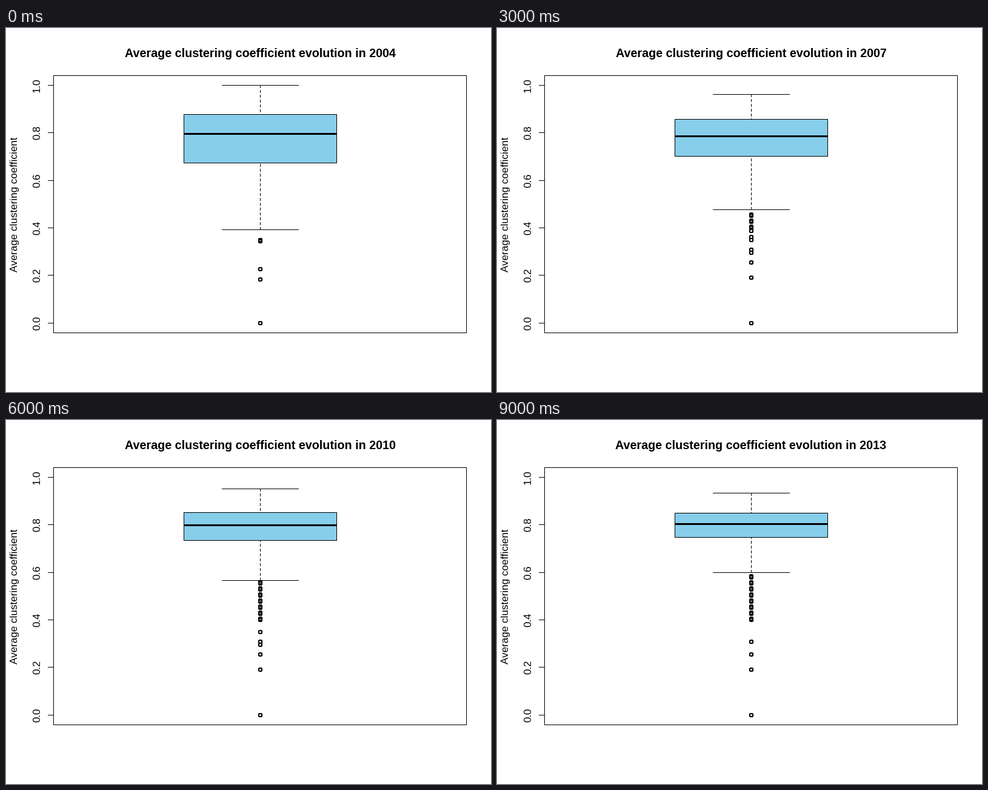
Animation of 800x600 px, one loop 10 s. Source, as a matplotlib script:

```python
import matplotlib.pyplot as plt
import numpy as np
from matplotlib.animation import FuncAnimation
from matplotlib.patches import Rectangle

W, H, DPI = 800, 600, 100
PX = 72 / DPI                      # points per pixel
FIRST_YEAR, YEARS = 2004, 10
MID, BOX_L, BOX_R, CAP_L, CAP_R = 419, 293, 545, 356, 482

# pixel rows of each part at a few key years; years between are interpolated
KEYS = [0, 1, 2, 3, 5, 9]
PARTS = {
    "top": [94, 94, 109, 109, 111, 120],
    "upper": [142, 147, 149, 150, 152, 153],
    "median": [174, 178, 181, 178, 174, 171],
    "lower": [222, 225, 215, 211, 199, 193],
    "bottom": [332, 335, 309, 299, 269, 251],
}

# outliers: pixel row, first and last year
LONE = [(486, 0, 9), (349, 0, 6), (351, 0, 1), (397, 0, 1), (414, 0, 1),
        (344, 1, 4), (334, 2, 3), (365, 2, 9), (370, 2, 6), (386, 2, 9),
        (411, 3, 9)]
# close pairs every ten rows, uncovered as the whisker rises
PAIRS = [(row + gap, 2, 9) for row in range(257, 330, 10) for gap in (0, 2)]

plt.rcParams["font.family"] = "Liberation Sans"
fig = plt.figure(figsize=(W / DPI, H / DPI), dpi=DPI, facecolor="white")
ax = fig.add_axes([0, 0, 1, 1])
ax.set_xlim(0, W)
ax.set_ylim(H, 0)
ax.axis("off")


def line(width=1, **kw):
    return ax.plot([], [], color="black", lw=width * PX, snap=False,
                   solid_capstyle="butt", dash_capstyle="butt", **kw)[0]


def hline(item, x0, x1, y):
    item.set_data([x0, x1 + 1], [y + 0.5, y + 0.5])


def vline(item, y0, y1):
    item.set_data([MID + 0.5, MID + 0.5], [y0, y1])


def frame(x0, y0, x1, y1, **kw):
    return ax.add_patch(Rectangle((x0 + 0.5, y0 + 0.5), x1 - x0, y1 - y0,
                                  lw=PX, ec="black", snap=False,
                                  joinstyle="round", **kw))


def label(x, y, text, size, **kw):
    return ax.text(x, y, text, fontsize=size * PX, ha="center", va="baseline",
                   rotation_mode="anchor", **kw)


frame(78, 78, 759, 502, fc="none")
for k in range(6):
    row = int(486.3 - 78.4 * k)
    hline(line(), 69, 78, row)
    label(56, row, f"{k / 5:.1f}", 17, rotation=90)
label(19, 290.5, "Average clustering coefficient", 16.95, rotation=90)
title = label(419, 48, "", 19.73, weight="bold")

box = frame(BOX_L, 0, BOX_R, 0, fc="#87ceeb", zorder=2)
median = line(3, zorder=3)
whiskers = [line(dashes=(5, 3), zorder=3) for _ in range(2)]
caps = [line(zorder=3) for _ in range(2)]
dots = ax.scatter([], [], s=(6 * PX) ** 2, facecolors="none",
                  edgecolors="black", linewidths=PX, snap=False,
                  antialiased=False, zorder=4)


def draw(year):
    at = {name: round(np.interp(year, KEYS, rows))
          for name, rows in PARTS.items()}
    title.set_text("Average clustering coefficient evolution in "
                   f"{FIRST_YEAR + year}")
    box.set_y(at["upper"] + 0.5)
    box.set_height(at["lower"] - at["upper"])
    hline(median, BOX_L, BOX_R, at["median"])
    vline(whiskers[0], at["top"], at["upper"])
    vline(whiskers[1], at["bottom"] + 1, at["lower"] + 1)
    hline(caps[0], CAP_L, CAP_R, at["top"])
    hline(caps[1], CAP_L, CAP_R, at["bottom"])
    dots.set_offsets([(MID + 0.5, row + 0.5) for row, first, last in LONE + PAIRS
                      if first <= year <= last and row > at["bottom"]])
    return [title, box, median, *whiskers, *caps, dots]


anim = FuncAnimation(fig, draw, frames=YEARS, interval=1000, repeat=True)
plt.show()
```
